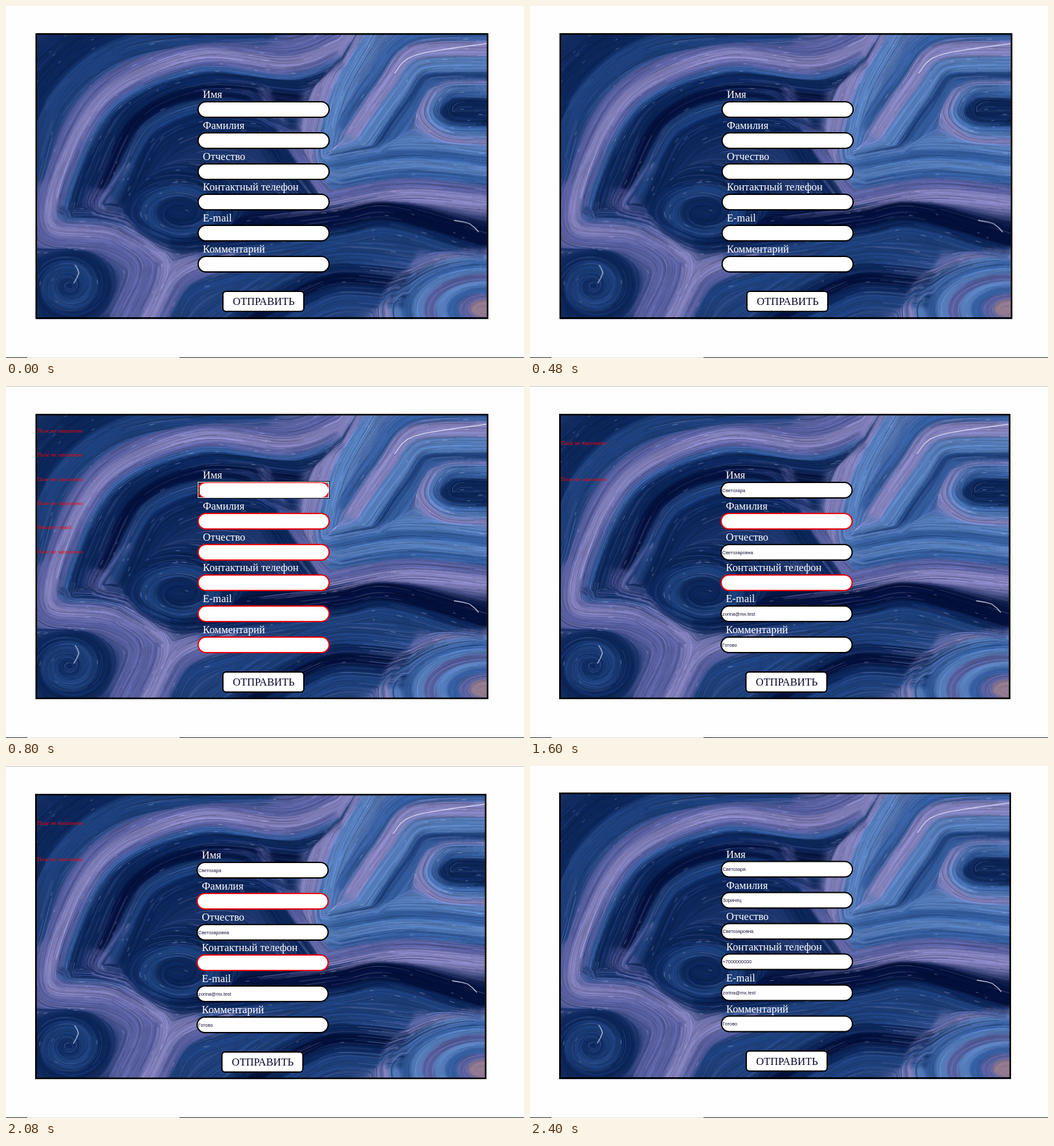
Recreate the animation shown at these times as an HTML page with a canvas. Size 800 by 544 pixels, loop 3200 ms.

```html
<!DOCTYPE html>
<html lang="ru">
<head>
<meta charset="utf-8">
<style>
html, body { margin: 0; width: 800px; height: 544px; overflow: hidden; background: #fefefe; }
canvas { display: block; }
</style>
</head>
<body>
<canvas id="stage" width="800" height="544"></canvas>
<script>
const ctx = document.getElementById('stage').getContext('2d');
const LEFT = 46, TOP = 42, WIDTH = 699, HEIGHT = 441, CELL = 4;
const SERIF = '"Liberation Serif", "Times New Roman", serif';
const SANS = '"Liberation Sans", Arial, sans-serif';

let seed = 7;
function random() {
  seed = (seed * 1664525 + 1013904223) % 4294967296;
  return seed / 4294967296;
}

// Marble: stripes set the colour and the flow direction of the space around them.
const deep = [4, 18, 62], navy = [13, 39, 90], blue = [30, 64, 122], steel = [52, 92, 156],
  sky = [86, 125, 186], slate = [88, 95, 158], lilac = [130, 128, 186], tan = [150, 125, 145];
const samples = [];

function spline(a, b, c, d, t) {
  return (2 * b + (c - a) * t + (2 * a - 5 * b + 4 * c - d) * t * t + (3 * b - a - 3 * c + d) * t ** 3) / 2;
}

function curve(coords) {
  const points = [], path = [];
  for (let i = 0; i < coords.length; i += 2) points.push([coords[i], coords[i + 1]]);
  const at = i => points[Math.max(0, Math.min(points.length - 1, i))];
  for (let i = 0; i < points.length - 1; i++) {
    const [a, b, c, d] = [at(i - 1), at(i), at(i + 1), at(i + 2)];
    const steps = Math.ceil(Math.hypot(c[0] - b[0], c[1] - b[1]) / 10);
    for (let k = 0; k < steps; k++) path.push([0, 1].map(n => spline(a[n], b[n], c[n], d[n], k / steps)));
  }
  path.push(at(points.length));
  return path;
}

function addStripe(path, color, width, offset = 0) {
  for (let i = 0; i < path.length - 1; i++) {
    const [x, y] = path[i], angle = Math.atan2(path[i + 1][1] - y, path[i + 1][0] - x);
    samples.push({
      x: x + offset * Math.sin(angle), y: y - offset * Math.cos(angle), width, color,
      cos: Math.cos(2 * angle), sin: Math.sin(2 * angle)
    });
  }
}

// Parallel stripes: the first lies on the curve, the others follow on its left side.
function band(colors, spacing, ...coords) {
  const path = curve(coords);
  colors.forEach((color, i) => addStripe(path, color, spacing / 3, i * spacing));
}

function rings(colors, cx, cy, rx, ry) {
  colors.forEach((color, i) => {
    const k = 1 - i / colors.length, steps = Math.ceil(rx * k * 0.6) + 8;
    addStripe(Array.from({ length: steps + 1 }, (_, n) => {
      const a = n / steps * 2 * Math.PI;
      return [cx + rx * k * Math.cos(a), cy + ry * k * Math.sin(a)];
    }), color, 4);
  });
}

band([slate, lilac, lilac, slate, steel, navy], 9, 500, 50, 430, 74, 290, 64, 145, 128, 72, 255, 62, 352, 160, 368, 240, 398);
band([blue, blue, navy, navy], 16, 50, 260, 92, 145, 200, 66, 400, 48);
band([navy, deep, blue, navy], 20, 440, 124, 300, 114, 190, 162, 132, 270);
band([slate], 12, 188, 247, 138, 310, 184, 330);
rings([navy, blue, navy], 270, 318, 75, 48);
band([navy, slate], 20, 380, 140, 430, 230, 480, 300);
band([lilac, lilac, sky, sky], 10, 532, 48, 488, 130, 466, 230, 490, 292);
band([steel, lilac, lilac, sky, sky, blue, steel], 12, 742, 48, 620, 56, 565, 120, 520, 185);
band([lilac, sky, steel, navy, navy], 10, 742, 118, 675, 122, 645, 170, 680, 205, 742, 210);
band([sky, steel, sky, steel, slate, lilac], 15, 742, 224, 610, 214, 485, 235);
band([deep, deep, navy, blue], 12, 742, 355, 590, 312, 500, 325, 300, 350);
band([blue, blue, navy, deep, navy, blue], 15, 620, 385, 500, 378, 400, 420, 310, 480);
band([lilac, slate, blue], 16, 345, 385, 265, 415, 225, 480);
band([slate, slate, lilac], 16, 170, 362, 212, 405, 182, 480);
rings([navy, blue, blue, navy], 98, 432, 50, 44);
rings([lilac, sky, steel, sky, slate, sky, steel, slate, tan], 742, 467, 158, 88);

function buildField() {
  const cols = Math.ceil(WIDTH / CELL), rows = Math.ceil(HEIGHT / CELL), cells = [];
  for (let j = 0; j < rows; j++) for (let i = 0; i < cols; i++) {
    const x = LEFT + (i + 0.5) * CELL, y = TOP + (j + 0.5) * CELL;
    let total = 0, cos = 0, sin = 0, r = 0, g = 0, b = 0;
    for (const s of samples) {
      const dx = x - s.x, dy = y - s.y;
      const gap = Math.max(0, Math.sqrt(dx * dx + dy * dy) - s.width);
      const weight = 1 / (gap * gap + 6) ** 2;
      total += weight;
      cos += weight * s.cos;
      sin += weight * s.sin;
      r += weight * s.color[0];
      g += weight * s.color[1];
      b += weight * s.color[2];
    }
    cells.push({ angle: Math.atan2(sin, cos) / 2, color: [r / total, g / total, b / total] });
  }
  return { cols, rows, cells };
}

function paintMarble() {
  const { cols, rows, cells } = buildField();
  const small = new OffscreenCanvas(cols, rows), base = small.getContext('2d');
  const pixels = base.createImageData(cols, rows);
  cells.forEach((cell, i) => pixels.data.set([...cell.color, 255], i * 4));
  base.putImageData(pixels, 0, 0);

  const marble = new OffscreenCanvas(WIDTH, HEIGHT), art = marble.getContext('2d');
  art.drawImage(small, 0, 0, cols * CELL, rows * CELL);

  const cellAt = (x, y) => cells[Math.floor(y / CELL) * cols + Math.floor(x / CELL)];
  const inside = (x, y) => x >= 0 && y >= 0 && x < WIDTH && y < HEIGHT;

  function streak(steps, style) {
    let x = random() * WIDTH, y = random() * HEIGHT;
    const start = cellAt(x, y);
    let heading = start.angle + (random() < 0.5 ? Math.PI : 0);
    art.strokeStyle = style(start.color);
    art.beginPath();
    art.moveTo(x, y);
    for (let i = 0; i < steps && inside(x, y); i++) {
      let angle = cellAt(x, y).angle;
      if (Math.cos(angle - heading) < 0) angle += Math.PI;
      heading = angle;
      x += 2 * Math.cos(angle);
      y += 2 * Math.sin(angle);
      art.lineTo(x, y);
    }
    art.stroke();
  }

  for (let i = 0; i < 6500; i++) {
    const light = 0.6 + random() * 0.8;
    art.lineWidth = 0.4 + random() * 0.8;
    streak(25 + random() * 45, color => `rgba(${color.map(v => Math.round(Math.min(255, v * light)))},.5)`);
  }
  art.lineWidth = 0.6;
  for (let i = 0; i < 300; i++) streak(30, () => 'rgba(160,158,212,.35)');
  for (let i = 0; i < 160; i++) streak(1 + random() * 3, () => 'rgba(235,235,250,.6)');

  art.translate(-LEFT, -TOP);
  art.lineWidth = 1.3;
  art.strokeStyle = 'rgba(240,240,255,.8)';
  function gleam(...coords) {
    art.beginPath();
    curve(coords).forEach(([x, y]) => art.lineTo(x, y));
    art.stroke();
  }
  gleam(107, 400, 113, 412, 105, 428);
  gleam(692, 331, 716, 336, 730, 349);
  gleam(742, 58, 632, 76, 600, 104);
  return marble;
}

const labels = ['Имя', 'Фамилия', 'Отчество', 'Контактный телефон', 'E-mail', 'Комментарий'];
const EMPTY = 'Поле не заполнено';
const partial = ['Светозара', '', 'Светозаровна', '', 'zorina@mx.test', 'Готово'];
const complete = partial.map((value, i) => value || (i === 1 ? 'Зоринец' : '+7000000000'));
const blank = labels.map(() => '');

const states = [
  { box: [45.5, 42, 745, 483.5], dx: 0, dy: 0, values: blank },
  { box: [45.5, 43, 745, 484], dx: 0, dy: 1, values: blank, invalid: true, focus: true, topLine: true,
    errors: labels.map((_, i) => [i === 4 ? 'Введите email' : EMPTY, 72 + i * 37.3]) },
  { box: [45, 43, 742, 484], dx: -1.5, dy: 1, values: partial, invalid: true, topLine: true,
    errors: [[EMPTY, 91], [EMPTY, 147]] },
  { box: [45, 41, 743, 483.5], dx: -1, dy: -0.5, values: complete }
];

function text(value, x, y, size, family, color) {
  ctx.font = `${size}px ${family}`;
  ctx.fillStyle = color;
  ctx.fillText(value, x, y);
}

function pill(x, y, w, h, radius, border) {
  ctx.beginPath();
  ctx.roundRect(x, y, w, h, radius);
  ctx.fillStyle = '#fff';
  ctx.fill();
  ctx.lineWidth = 2;
  ctx.strokeStyle = border;
  ctx.stroke();
}

function outline(x, y, w, h, color, lineWidth = 1) {
  ctx.lineWidth = lineWidth;
  ctx.strokeStyle = color;
  ctx.strokeRect(x, y, w, h);
}

function bar(color, x, y, w) {
  ctx.fillStyle = color;
  ctx.fillRect(x, y, w, 1);
}

function drawForm(state) {
  ctx.save();
  ctx.translate(state.dx, state.dy);
  labels.forEach((label, i) => {
    const y = Math.round(148 + i * 47.8), value = state.values[i];
    text(label, 304, y - 6, 16.5, SERIF, '#fff');
    pill(296.7, y, 202.3, 24, 12, state.invalid && !value ? '#e8000b' : '#000');
    text(value, 298.5, y + 14.5, 7.3, SANS, '#14143c');
  });
  if (state.focus) {
    outline(295.5, 146.5, 204, 26, '#111');
    outline(296.5, 147.5, 202, 24, '#eee');
    ctx.fillStyle = '#000';
    ctx.fillRect(298, 155, 1, 10);
  }
  pill(335, 441, 125, 31, 5, '#000');
  ctx.textAlign = 'center';
  text('ОТПРАВИТЬ', 398, 462, 16.5, SERIF, '#06062a');
  ctx.restore();
}

const marble = paintMarble();
const start = performance.now();

function draw() {
  const state = states[Math.floor((performance.now() - start) % 3200 / 800)];
  const [x1, y1, x2, y2] = state.box;
  ctx.fillStyle = '#fefefe';
  ctx.fillRect(0, 0, 800, 544);
  if (state.topLine) bar('#c8c8c8', 0, 0, 800);
  bar('#30343c', 0, 543, 800);
  bar('#e4e4e4', 33, 543, 235);
  ctx.drawImage(marble, x1, y1, x2 - x1, y2 - y1);
  outline(x1 + 1.25, y1 + 1.25, x2 - x1 - 2.5, y2 - y1 - 2.5, '#000', 2.5);
  for (const [message, y] of state.errors || []) text(message, 48, y, 8.8, SERIF, '#f00');
  drawForm(state);
  requestAnimationFrame(draw);
}
draw();
</script>
</body>
</html>
```
